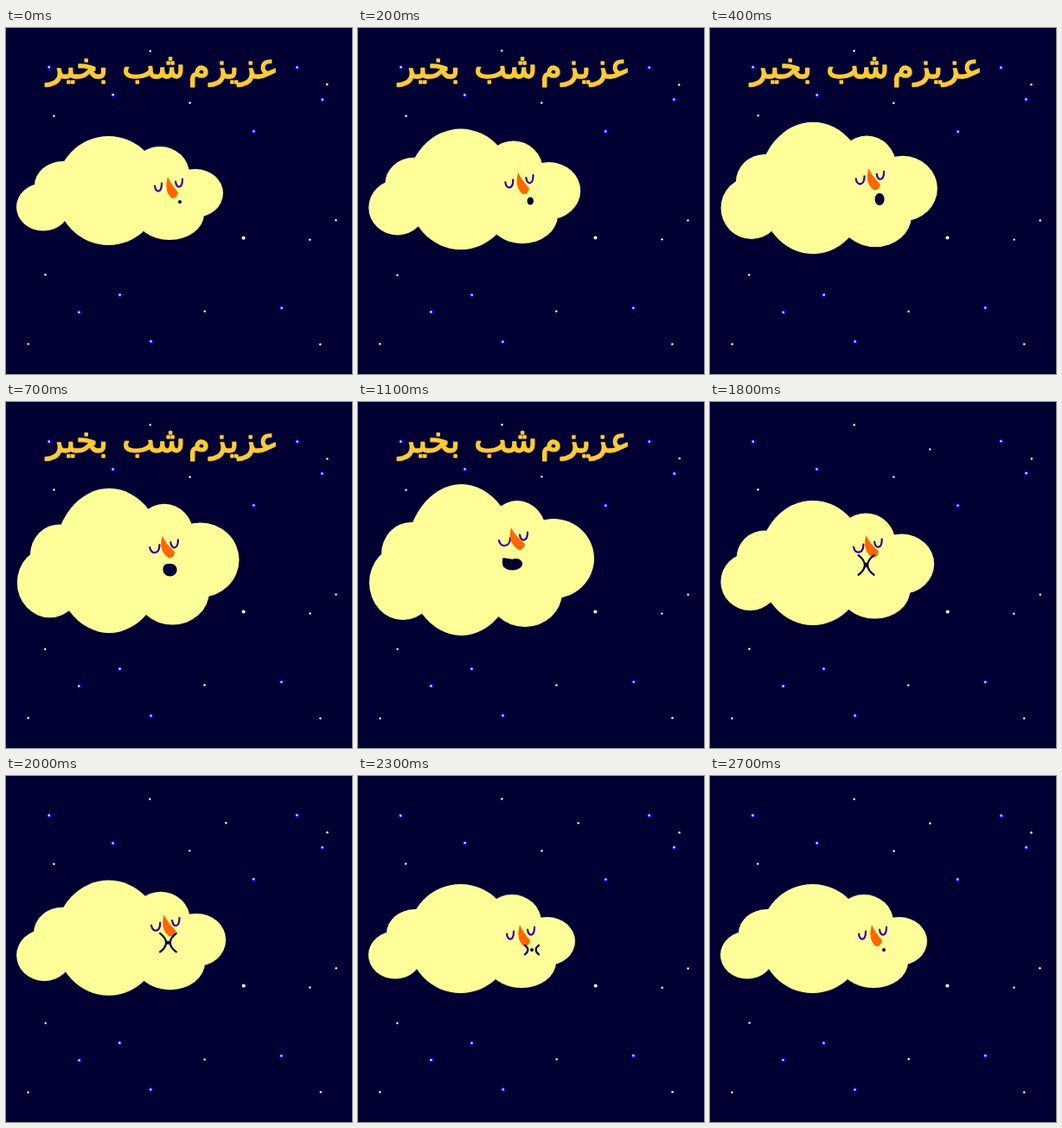
Animation of 400x400 px, one loop 2800 ms. Source, as an HTML page:

```html
<!DOCTYPE html>
<html lang="fa">
<head>
<meta charset="utf-8">
<title>Sleeping cloud</title>
<style>
  html, body { margin: 0; width: 100%; height: 100%; overflow: hidden; background: #000033; }
  svg { display: block; width: 100vw; height: 100vh; }
  text {
    font: 40px "DejaVu Sans", sans-serif; direction: rtl; text-anchor: start;
    fill: #ffcc33; stroke: #ffcc33; stroke-width: 1.6; stroke-linejoin: round;
  }
  .line { fill: none; stroke-width: 2.2; stroke-linecap: round; stroke-linejoin: round; }
</style>
</head>
<body>
<svg viewBox="0 0 400 400">
  <g id="stars"></g>
  <g id="cloud" fill="#ffff99"></g>
  <path id="eyes" class="line" stroke="#330099"/>
  <path id="nose" fill="#ff6600"/>
  <path id="mouth" fill="#000033"/>
  <path id="lips" class="line" stroke="#000033"/>
  <g id="greeting">
    <text x="315" y="58">عزيزم</text>
    <text x="207" y="58">شب</text>
    <text x="118" y="58">بخير</text>
  </g>
</svg>
<script>
const LOOP = 2800, STEP = 100, TEXT_END = 1400;
const INHALED = 1100, EXHALED = 2300;
const LIPS_START = 1200, LIPS_END = 2500;

// Each lobe at rest and full of air: cx, cy, rx, ry.
const LOBES = [
  { rest: [43, 207, 31, 27.5], full: [52, 209, 39, 43] },
  { rest: [66, 182, 33, 28], full: [61, 176, 34, 37] },
  { rest: [118.5, 188, 61, 63], full: [119.5, 182.5, 65, 87.5] },
  { rest: [178, 169, 34, 32], full: [184, 152, 34, 38] },
  { rest: [219, 191, 32, 28], full: [226, 181, 47, 46] },
  { rest: [189, 215, 40, 30], full: [193, 220, 43, 40] }
];
const WHITE_STARS = [[166, 26], [371, 65], [212, 86], [55, 101], [254, 54], [274, 242, 2],
  [351, 244], [381, 222], [45, 285], [229, 327], [25, 365], [363, 365]];
const BLUE_STARS = [[49, 45], [123, 77], [336, 45], [365, 82], [286, 119], [131, 308], [84, 328], [318, 323], [167, 362]];

const $ = id => document.getElementById(id);
const attrs = (node, values) => {
  for (const key in values) node.setAttribute(key, values[key]);
  return node;
};
const make = (parent, tag, values = {}) =>
  attrs(parent.appendChild(document.createElementNS("http://www.w3.org/2000/svg", tag)), values);
const show = (id, on) => attrs($(id), { visibility: on ? "visible" : "hidden" });
const mix = (a, b, k) => a.map((v, i) => v + (b[i] - v) * k);

function addStar([x, y, r = 1.2], glow) {
  const node = make($("stars"), "g");
  if (glow) make(node, "circle", { r: 2.5, fill: "#0000ff" });
  make(node, "circle", { r, fill: "#fff" });
  return { x: x + 0.5, y: y + 0.5, node };
}
const stars = [...WHITE_STARS.map(s => addStar(s, false)), ...BLUE_STARS.map(s => addStar(s, true))];
const lobes = LOBES.map(() => make($("cloud"), "ellipse"));

// Seeded noise from -0.5 to 0.5.
function noise(seed) {
  const v = Math.sin(seed * 12.9898) * 43758.5453;
  return v - Math.floor(v) - 0.5;
}

function eyePath([x, y, w]) {
  return `M${x - w} ${y - 1.5}C${x - w + 1} ${y + 7} ${x + w} ${y + 7} ${x + w} ${y - 4.5}`;
}

function nosePath([x, y, ex, ey]) {
  return `M${x} ${y}Q${x + 4} ${y + 9} ${ex + 6} ${ey - 1}` +
    `Q${ex + 5} ${ey + 6} ${ex - 1} ${ey + 6}Q${x - 5} ${ey - 2} ${x} ${y}Z`;
}

// A rounded shape; corner squares off its upper left.
function mouthPath([x, y], rx, ry, corner) {
  const k = 0.55, c = k + corner * 0.6;
  return `M${x - rx} ${y}C${x - rx} ${y - ry * c} ${x - rx * c} ${y - ry} ${x} ${y - ry * (1 - corner * 0.3)}` +
    `C${x + rx * k} ${y - ry} ${x + rx} ${y - ry * k} ${x + rx} ${y}` +
    `C${x + rx} ${y + ry * k} ${x + rx * k} ${y + ry} ${x} ${y + ry}` +
    `C${x - rx * k} ${y + ry} ${x - rx} ${y + ry * k} ${x - rx} ${y}Z`;
}

function lipsPath([x, y], gap, h) {
  const flare = h * 0.65;
  const side = s => `M${x + s * (gap + flare)} ${y - h}Q${x + s * (gap - flare)} ${y} ${x + s * (gap + flare)} ${y + h}`;
  return side(-1) + side(1);
}

function draw(t) {
  const inhaling = t <= INHALED;
  const inhale = Math.min(1, t / INHALED);
  const exhale = Math.min(1, Math.max(0, (t - INHALED) / (EXHALED - INHALED)));
  const air = inhaling ? Math.sin(inhale * Math.PI / 2) : (1 + Math.cos(exhale * Math.PI)) / 2;
  const lift = inhaling ? inhale : 1 - exhale ** 2;

  stars.forEach(({ x, y, node }, i) => {
    const seed = t / STEP * 31 + i;
    attrs(node, { transform: `translate(${x + noise(seed + 1) * 0.6} ${y + noise(seed + 90) * 0.6})` });
  });
  lobes.forEach((node, i) => {
    const [cx, cy, rx, ry] = mix(LOBES[i].rest, LOBES[i].full, air);
    attrs(node, { cx, cy, rx, ry });
  });

  const left = mix([176, 184, 4], [169.5, 161.5, 6.5], lift);
  const right = mix([200, 179, 4], [191.5, 155, 4.5], lift);
  attrs($("eyes"), { d: eyePath(left) + eyePath(right) });
  attrs($("nose"), { d: nosePath(mix([187, 172, 193, 191], [177, 145, 187, 165], lift)) });

  const rest = [201, 201];
  const mouth = inhaling ? mix(rest, [178.5, 187], inhale ** 1.5) : mix([170, 182], rest, exhale ** 2);
  const rx = 2 + 9.5 * (inhaling ? inhale : (1 - exhale) ** 3);
  const ry = inhaling ? 2 + 5.5 * Math.min(1, inhale * 2.5) : rx;
  attrs($("mouth"), { d: mouthPath(mouth, rx, ry, inhaling ? inhale ** 3 : 0) });

  const blow = (t - LIPS_START) / (LIPS_END - LIPS_START);
  attrs($("lips"), { d: lipsPath(mouth, 1 + 6 * blow ** 3, 11.5 * Math.sin(Math.PI * blow)) });
  show("lips", blow > 0 && blow < 1);
  show("greeting", t < TEXT_END);
}

const start = performance.now();
function tick() {
  const t = (performance.now() - start) % LOOP;
  draw(Math.floor(t / STEP) * STEP);
  requestAnimationFrame(tick);
}
tick();
</script>
</body>
</html>
```
